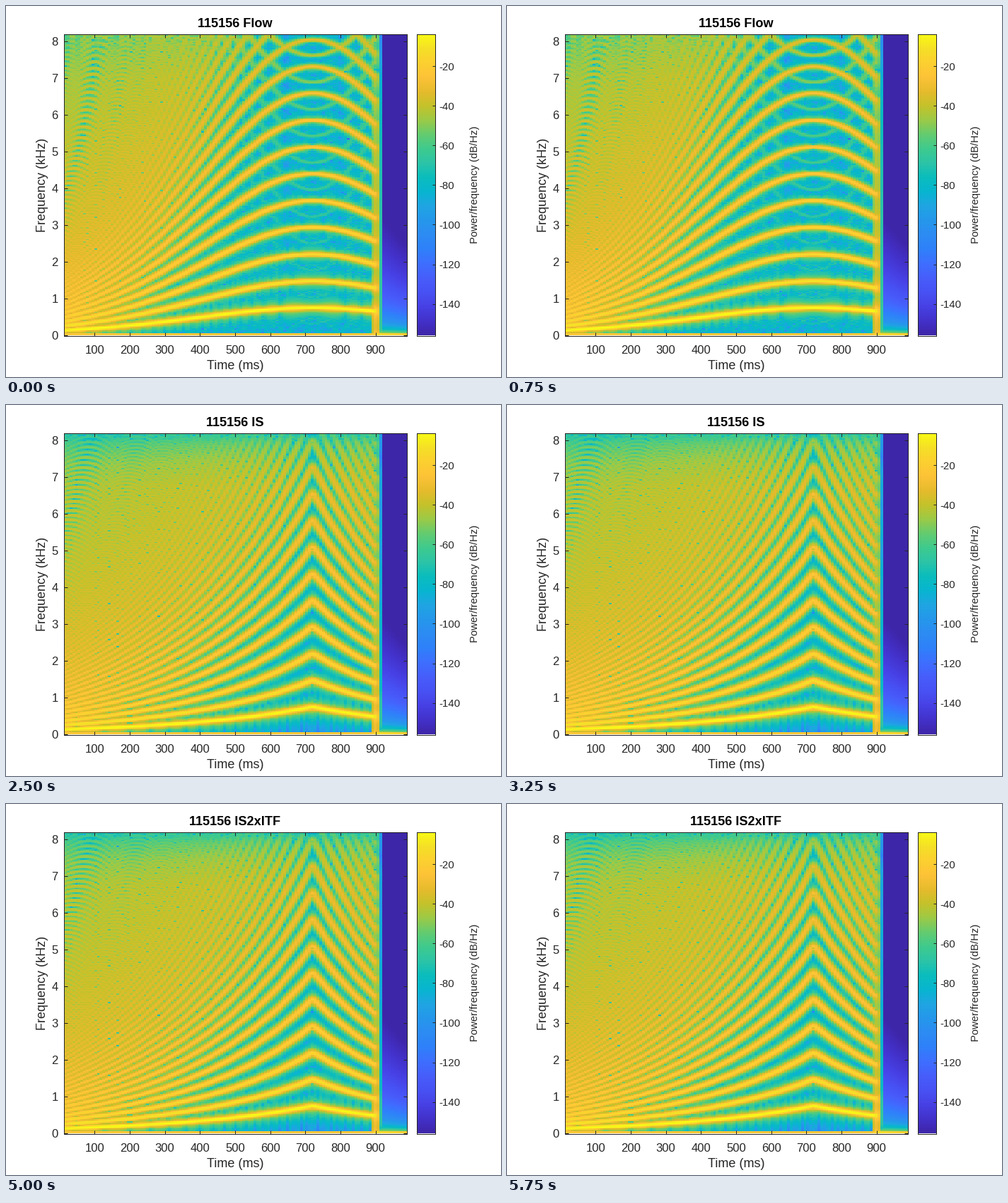
Recreate the animation shown at these times as a matplotlib script. Size 700x525 px, loop 6.25 s.

```python
import numpy as np
import matplotlib.pyplot as plt
from matplotlib.animation import FuncAnimation
from matplotlib.colors import LinearSegmentedColormap

W, H, DPI = 700, 525, 100
FS, WIN, HOP = 16384, 512, 128
LO, HI = -156, -3.7
INK = "#262626"
START, OCTAVES, TURN, END = 115.156, 32 / 12, 0.72, 0.9

plt.rcParams["font.family"] = "Liberation Sans"

PARULA = LinearSegmentedColormap.from_list("parula", [
    "#3e26a8", "#4332cb", "#4741e5", "#4852f4", "#475efb", "#3e6fff",
    "#2f81fa", "#2d8cf3", "#2597eb", "#20a5e3", "#08b5d0", "#0bbdbd",
    "#2cc4a7", "#3fca8e", "#64cc6f", "#9dca47", "#c5c22a", "#e6bb2d",
    "#fec338", "#fcd030", "#f5e027", "#f9fb15"], N=256)

# Pitch over time: a smooth arch and a straight glide, both in octaves
t = np.arange(FS) / FS
arch = START * 2 ** (OCTAVES * np.sin(np.pi / 2 * t / TURN))
glide = START * 2 ** (OCTAVES * (1 - np.abs(t - TURN) / TURN))

# Roll-off curves: frequency in kHz, level in dB
SOFT = ([0, 5, 7, 8, 8.8, 10, 13, 16], [0, 0, -2, -7, -18, -28, -36, -42])
SHARP = ([0, 7.5, 7.9, 8.2, 9, 10], [0, -1, -8, -28, -40, -90])
EARLY = ([0, 6.7, 7.4, 7.9, 8.2, 10], [0, -1, -6, -14, -28, -90])
MIDDLE = ([0, 7.0, 7.6, 7.9, 8.2, 10], [0, -1, -6, -12, -28, -90])


def tone(f0, rolloff):
    """Band-limited sawtooth that stops at END and leaves a slow decay."""
    phase = 2 * np.pi * np.cumsum(f0) / FS
    out = np.zeros(FS)
    for k in range(1, int(16000 / f0.min())):
        level = np.interp(k * f0 / 1000, *rolloff)
        out += 10 ** (level / 20) * np.sin(k * phase) / k
    tail = 1.8 * np.exp(-(t - END) / 0.09)
    return np.where(t < END, 0.5 + 6.1 * out, tail)


def spectrogram(x):
    win = np.hanning(WIN + 1)[:-1]
    starts = np.arange(0, FS - WIN + 1, HOP)
    cols = np.array([x[s:s + WIN] * win for s in starts])
    power = np.abs(np.fft.rfft(cols)) ** 2 / (FS * np.sum(win ** 2))
    power[:, 1:-1] *= 2
    return 10 * np.log10(power.T + 1e-30)


scenes = [(title, spectrogram(tone(f0, rolloff))) for title, f0, rolloff in [
    ("115156 Flow", arch, SOFT),
    ("115156 GT", glide, SHARP),
    ("115156 IS", glide, EARLY),
    ("115156 IS2", glide, MIDDLE),
    ("115156 IS2xITF", glide, EARLY)]]

fig = plt.figure(figsize=(W / DPI, H / DPI), dpi=DPI, facecolor="white")


def px(size):
    return size * 72 / DPI


def panel(x0, y0, x1, y1):
    ax = fig.add_axes([x0 / W, 1 - y1 / H, (x1 - x0) / W, (y1 - y0) / H])
    for side in ax.spines.values():
        side.set(linewidth=px(1), color=INK)
    return ax


def label(x, y, text, size, **style):
    style = {"color": INK, "ha": "center", "va": "center", **style}
    return fig.text(x / W, 1 - y / H, text, fontsize=px(size), **style)


ticks = dict(direction="in", width=px(1), color=INK, labelcolor=INK)

ax = panel(81.5, 39.5, 566.5, 466.5)
half = HOP / FS * 500
step = FS / WIN / 1000
extent = (WIN / FS * 500 - half, 1000 - WIN / FS * 500 + half,
          -step / 2, FS / 2000 + step / 2)
img = ax.imshow(scenes[0][1], cmap=PARULA, vmin=LO, vmax=HI, origin="lower",
                extent=extent, aspect="auto", interpolation="nearest")
ax.set_xticks(range(100, 1000, 100))
ax.set_yticks(range(9))
ax.tick_params(top=True, right=True, length=px(5), labelsize=px(16.6),
               pad=px(8), **ticks)
ax.tick_params(axis="x", pad=px(13))

bar = panel(580.5, 39.5, 606.5, 466.5)
bar.imshow(np.arange(256)[:, None], cmap=PARULA, origin="lower",
           extent=(0, 1, LO, HI), aspect="auto", interpolation="nearest")
bar.set_xticks([])
bar.set_yticks(range(-140, 0, 20))
bar.yaxis.tick_right()
bar.tick_params(length=px(4), labelsize=px(15), pad=px(6), **ticks)
bar.set_yticklabels([str(v) for v in range(-140, 0, 20)])

label(324, 509, "Time (ms)", 18)
label(51, 253, "Frequency (kHz)", 18, rotation=90)
label(663, 253, "Power/frequency (dB/Hz)", 14.9, rotation=90)
title = label(324, 26, "", 18.2, weight="bold", color="black")


def draw(i):
    name, data = scenes[i]
    title.set_text(name)
    img.set_data(data)
    return img, title


anim = FuncAnimation(fig, draw, frames=len(scenes), interval=1250,
                     repeat=True, repeat_delay=0, blit=False)
plt.show()
```
